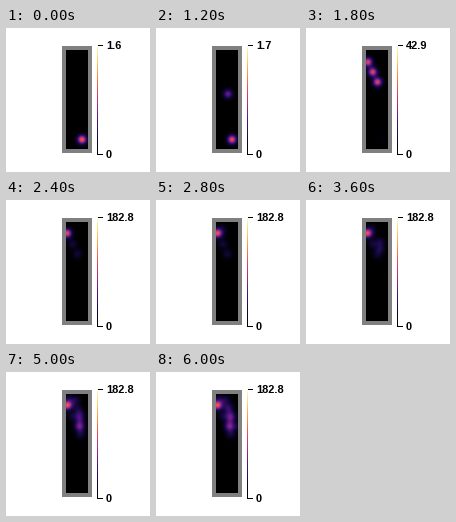
Animation, 144 px wide and 144 px high, one loop 8000 ms. Source, as a matplotlib script:

```python
import numpy as np
import matplotlib.pyplot as plt
from matplotlib.animation import FuncAnimation
from matplotlib.colors import LinearSegmentedColormap
from matplotlib.patches import Rectangle

SIZE, STEP, LOOP = 144, 200, 8000
LEFT, RIGHT, TOP, BOTTOM = 60, 82, 22, 121
SPREAD = 3.2

HEAT = LinearSegmentedColormap.from_list("heat", [
    (0.0, "#000000"), (0.15, "#14083e"), (0.3, "#4a1280"),
    (0.45, "#a02c80"), (0.6, "#f04a50"), (0.75, "#ff9a40"),
    (0.9, "#ffe070"), (1.0, "#fffbd0")])

# first step, number of visits, start, end, strength of each visit
LEGS = [
    (0, 1, (76, 111.5), (76, 111.5), 1.0),
    (6, 1, (72, 66), (72, 66), 0.6),
    (7, 3, (71.5, 54), (62, 34), 24),
    (10, 3, (61, 33), (61, 33), 28),
    (13, 2, (66, 33), (66, 28), 14),
    (17, 4, (74, 42), (74.5, 62), 28),
    (21, 4, (74.5, 54), (70.5, 28), 22),
    (25, 1, (62, 26.5), (62, 26.5), 14),
    (28, 3, (73, 35), (81, 54), 20),
]

px, py = np.meshgrid(np.arange(LEFT, RIGHT) + 0.5,
                     np.arange(TOP, BOTTOM) + 0.5)


def scale_at(step):
    return np.interp(step, [0, 1, 6, 8, 9, 12],
                     [1.6, 1.7, 1.7, 42.9, 42.9, 182.8])


def heat_at(step):
    total = np.zeros_like(px)
    for first, count, start, end, strength in LEGS:
        spots = np.linspace(start, end, count)
        for x, y in spots[:max(0, step - first + 1)]:
            dist2 = (px - x) ** 2 + (py - y) ** 2
            total += strength * np.exp(-dist2 / (2 * SPREAD ** 2))
    return total / scale_at(step)


fig = plt.figure(figsize=(SIZE / 72, SIZE / 72), dpi=72, facecolor="white")
ax = fig.add_axes([0, 0, 1, 1])
ax.axis("off")


def box(x, y, w, h, color):
    ax.add_patch(Rectangle((x, y), w, h, fc=color, lw=0, antialiased=False))


def label(y, text):
    return ax.text(100, y, text, family="Liberation Sans", weight="bold",
                   size=11, va="baseline")


def heat_image(data, extent):
    return ax.imshow(data, cmap=HEAT, vmin=0, vmax=1, aspect="auto",
                     extent=extent, interpolation="nearest", zorder=2)


box(56, 18, 30, 107, "#808080")
for y in (17, 126):
    box(92, y, 5, 1, "black")
heat_image(np.linspace(1, 0, 110)[:, None], (91, 92, 127, 17))
field = heat_image(heat_at(0), (LEFT, RIGHT, BOTTOM, TOP))
ax.set_xlim(0, SIZE)
ax.set_ylim(SIZE, 0)
top_label = label(21, "1.6")
label(130, "0")


def draw(step):
    field.set_data(heat_at(step))
    top_label.set_text(f"{scale_at(step):.1f}")
    return field, top_label


anim = FuncAnimation(fig, draw, frames=LOOP // STEP, interval=STEP,
                     repeat=True, repeat_delay=0, blit=False)
plt.show()
```
